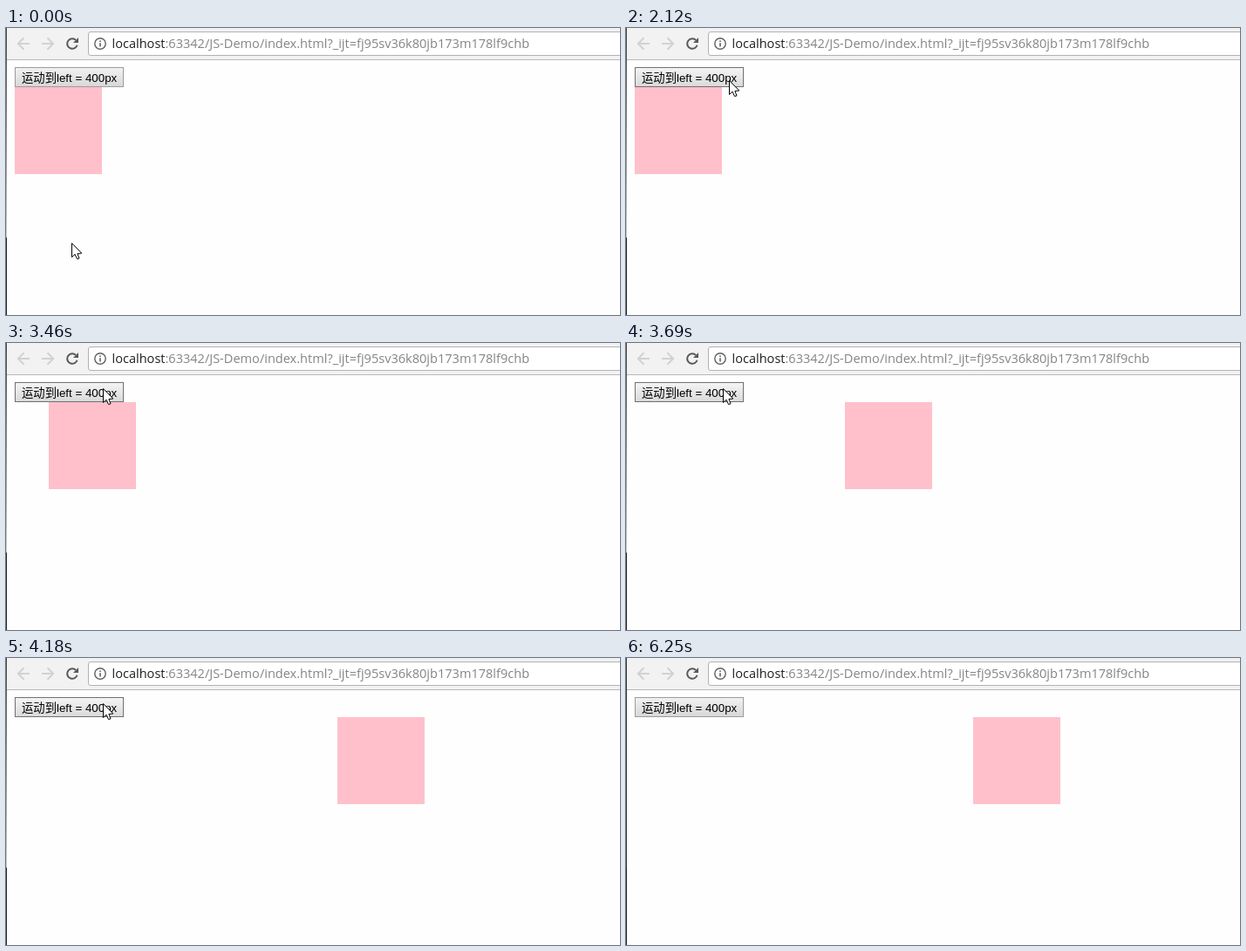
Write an HTML page with a canvas that moves like this. It is 704 px wide and 330 px high and loops after 6.35 s.

```html
<!DOCTYPE html>
<html lang="zh-CN">
<head>
<meta charset="utf-8">
<title>Easing demo</title>
<style>
html, body { margin: 0; width: 100%; height: 100%; overflow: hidden; background: #fefefe; }
canvas { display: block; }
</style>
</head>
<body>
<canvas id="stage" width="704" height="330"></canvas>
<script>
const LOOP = 6350;
const SLIDE_START = 3455, REFRESH = 72, TICK = 27;
const HOVER_START = 2060, PRESS = 3370, EXIT = 5410;
const ctx = document.getElementById('stage').getContext('2d');
const URL_FONT = '14.55px "Open Sans", "Noto Sans", sans-serif';
const BUTTON_FONT = '13.333px "Liberation Sans", "Noto Sans CJK SC", "Noto Sans CJK", sans-serif';

const linear = u => u;
const easeOut = u => 1 - (1 - u) ** 3;

// The pointer rests between moves; "via" bends the path.
const moves = [
  { from: 150, to: 390, end: [79, 245] },
  { from: 1170, to: 1230, end: [72, 241] },
  { from: 1320, to: 2000, via: [213, 130], end: [126, 68] },
  { from: 2000, to: 2470, end: [112, 54], ease: easeOut },
  { from: 2630, to: 2810, end: [111, 52] },
  { from: 4500, to: 4620, end: [109, 52] },
  { from: 5180, to: 5330, end: [118, 61] }
];

function quad(a, b, c, u) {
  return (1 - u) * (1 - u) * a + 2 * u * (1 - u) * b + u * u * c;
}

function pointerAt(t) {
  let pos = [75, 247];
  for (const { from, to, via, end, ease = linear } of moves) {
    if (t < from) break;
    const u = ease(Math.min(1, (t - from) / (to - from)));
    pos = pos.map((p, i) => Math.round(quad(p, via ? via[i] : (p + end[i]) / 2, end[i], u)));
  }
  return pos;
}

// Each tick covers a tenth of the remaining way, rounded to whole pixels.
function boxLeft(t) {
  let left = 8;
  if (t < SLIDE_START) return left;
  const shown = Math.floor((t - SLIDE_START) / REFRESH) * REFRESH;
  const ticks = Math.floor(shown / TICK) + 1;
  for (let i = 0; i < ticks; i++) left = Math.round(left + (400 - left) / 10);
  return left;
}

function rect(x, y, w, h, color) {
  ctx.fillStyle = color;
  ctx.fillRect(x, y, w, h);
}

function fade(y0, y1, top, bottom) {
  const g = ctx.createLinearGradient(0, y0, 0, y1);
  g.addColorStop(0, top);
  g.addColorStop(1, bottom);
  return g;
}

function stroke(color, width) {
  ctx.strokeStyle = color;
  ctx.lineWidth = width;
  ctx.stroke();
}

function path(points) {
  ctx.beginPath();
  points.forEach(([x, y]) => ctx.lineTo(x, y));
}

function arrow(tip, dir) {
  path([[tip, 18], [tip + dir * 14, 18]]);
  stroke('#d2d2d2', 2);
  path([[tip + dir * 7.5, 11.2], [tip + dir * 0.9, 18], [tip + dir * 7.5, 24.8]]);
  stroke('#d2d2d2', 2);
}

function reload() {
  ctx.beginPath();
  ctx.arc(76, 18, 5.8, 0.3, Math.PI * 1.75);
  stroke('#5a5a5a', 2);
  path([[83, 11], [83, 17], [77, 17]]);
  ctx.fillStyle = '#5a5a5a';
  ctx.fill();
}

function infoIcon() {
  ctx.beginPath();
  ctx.arc(108, 18, 6.2, 0, Math.PI * 2);
  stroke('#606060', 1.4);
  rect(107.2, 14.4, 1.6, 1.6, '#606060');
  rect(107.2, 17.2, 1.6, 4.2, '#606060');
}

function toolbar() {
  rect(0, 0, 704, 36, '#f2f2f2');
  rect(0, 36, 704, 1, '#b8b8b8');
  arrow(13, 1);
  arrow(55, -1);
  reload();

  ctx.beginPath();
  ctx.roundRect(94.5, 4.5, 640, 27, 2.5);
  ctx.fillStyle = '#fff';
  ctx.fill();
  stroke('#b2b2b2', 1);
  infoIcon();

  const host = 'localhost', x = 121.5;
  ctx.font = URL_FONT;
  ctx.fillStyle = '#1e1e1e';
  ctx.fillText(host, x, 23);
  ctx.fillStyle = '#848484';
  ctx.fillText(':63342/JS-Demo/index.html?_ijt=fj95sv36k80jb173m178lf9chb',
    x + ctx.measureText(host).width, 23);
}

function button(t) {
  const hover = t >= HOVER_START && t < EXIT;
  const pressed = t >= PRESS && t < SLIDE_START;
  const [top, bottom] = pressed ? ['#dcdcdc', '#e8e8e8'] : hover ? ['#f4f4f4', '#dadada'] : ['#f1f1f1', '#d8d8d8'];
  rect(10, 45, 125, 23, hover ? '#707070' : '#9c9c9c');
  rect(11, 46, 123, 21, fade(46, 67, top, bottom));
  ctx.font = BUTTON_FONT;
  ctx.fillStyle = '#000';
  ctx.fillText('运动到left = 400px', 18, 62);
}

function pointer(x, y) {
  const shape = [[0, 0], [0, 16], [3.6, 12.7], [6, 18], [8.5, 17.4], [6.4, 12], [11.3, 11.5]];
  path(shape.map(([dx, dy]) => [x + 0.5 + dx, y + 0.5 + dy]));
  ctx.closePath();
  ctx.fillStyle = '#fff';
  ctx.fill();
  stroke('#000', 1);
}

function draw(t) {
  rect(0, 0, 704, 330, '#fefefe');
  toolbar();
  rect(0, 0, 1, 241, t < 6250 ? fade(0, 241, '#404040', '#c8c8c8') : '#34343a');
  rect(0, 241, 1, 89, '#1c202c');
  rect(boxLeft(t) + 2, 68, 100, 100, '#ffc0cb');
  button(t);
  if (t < EXIT) pointer(...pointerAt(t));
}

const start = performance.now();
function frame() {
  draw((performance.now() - start) % LOOP);
  requestAnimationFrame(frame);
}
frame();
</script>
</body>
</html>
```
